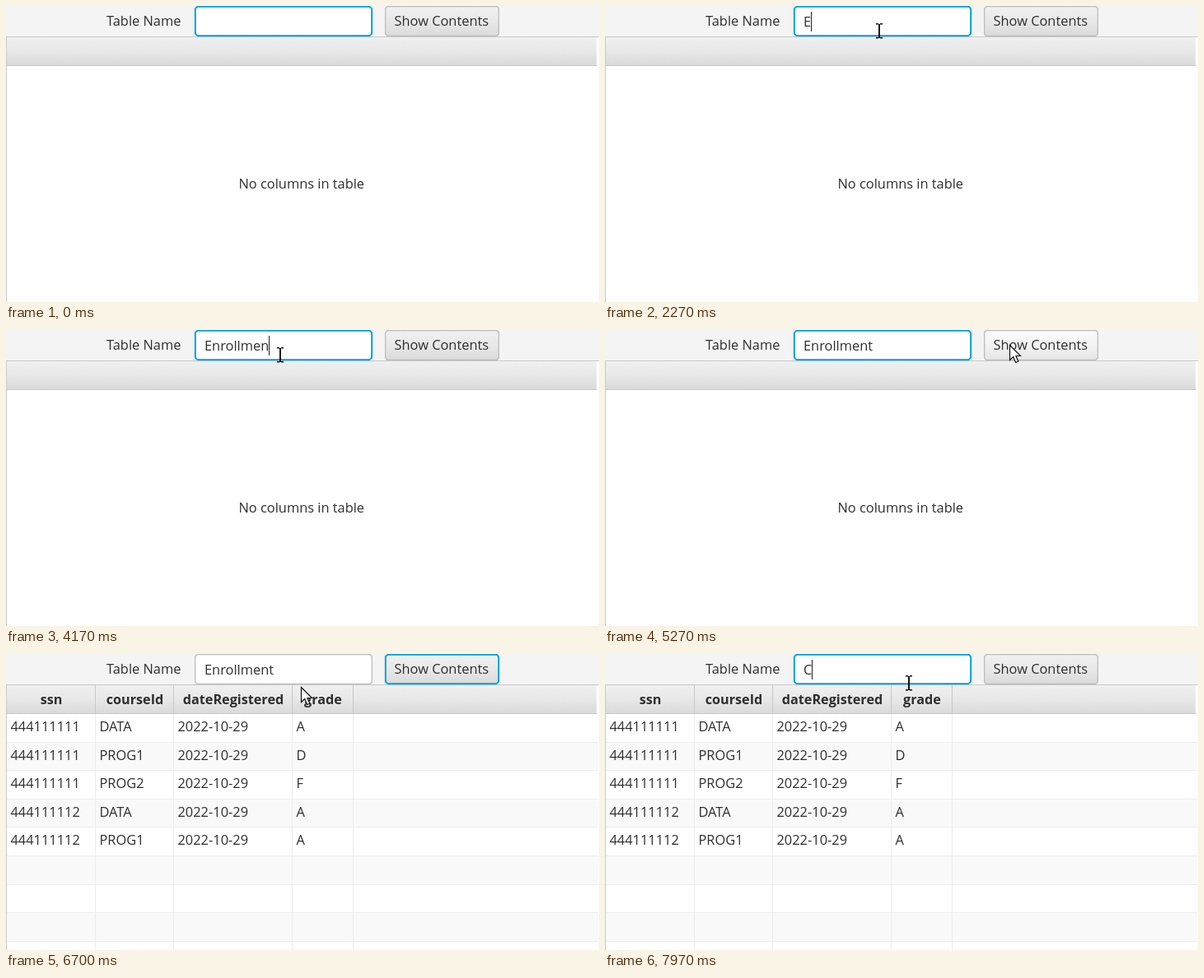
These frames come from a looping animation (720 px wide and 360 px high, 8 s). An HTML page with a canvas:

```html
<!DOCTYPE html>
<html lang="en">
<head>
<meta charset="utf-8">
<title>Show table contents</title>
<style>
  html, body { margin: 0; width: 100%; height: 100%; overflow: hidden; background: #f4f4f4; }
  canvas { display: block; width: 720px; height: 360px; }
</style>
</head>
<body>
<canvas id="stage" width="720" height="360"></canvas>
<script>
const ctx = document.getElementById('stage').getContext('2d');
const LOOP = 8000;
const FONT = '16.4px "Open Sans", "Noto Sans", sans-serif';
const BOLD = 'bold 16.2px "Open Sans", "Noto Sans", sans-serif';
const INK = '#2e2e2e', FOCUS = '#039ed3', HALO = '#039ed322', BORDER = '#bdbdbd', GRID = '#ededed';
const HEADER_Y = 38, BODY_Y = 72, ROW_H = 34.6;
const FIELD = { x: 229, y: 0, w: 216, h: 37 };
const BUTTON = { x: 460, y: 0, w: 139, h: 37 };
const TEXT_X = 241;

const COLUMNS = [
  { name: 'ssn', x: 0, end: 108 },
  { name: 'courseId', x: 108, end: 203 },
  { name: 'dateRegistered', x: 203, end: 347 },
  { name: 'grade', x: 347, end: 421 }
];
const DATE = '2022-10-29';
const ROWS = [
  ['444111111', 'DATA', DATE, 'A'],
  ['444111111', 'PROG1', DATE, 'D'],
  ['444111111', 'PROG2', DATE, 'F'],
  ['444111112', 'DATA', DATE, 'A'],
  ['444111112', 'PROG1', DATE, 'A']
];

const PRESS_BUTTON = 5650, TABLE_LOADED = 5850, PRESS_FIELD = 7050;

// Field contents over time: [time, text]
const WORD = 'Enrollment';
const EDITS = [[400, '']];
for (let i = 1; i <= WORD.length; i++) EDITS.push([1965 + 235 * i, WORD.slice(0, i)]);
EDITS.push([PRESS_FIELD, WORD]);
for (let i = 1; i <= WORD.length; i++) EDITS.push([7250 + 45 * i, WORD.slice(0, -i)]);
EDITS.push([7850, 'C']);

// Pointer stops: [time, x, y]
const PATH = [
  [0, 644, 372], [276, 644, 372], [1050, 333, 30], [4600, 333, 30],
  [5400, 503, 17], [6200, 503, 17], [6700, 358, 40], [6950, 369, 35], [LOOP, 369, 35]
];

function pointerAt(t) {
  const i = PATH.findIndex(stop => stop[0] > t);
  const [t0, x0, y0] = PATH[i - 1], [t1, x1, y1] = PATH[i];
  const u = (t - t0) / (t1 - t0), k = u * u * (3 - 2 * u);
  return { x: x0 + (x1 - x0) * k, y: y0 + (y1 - y0) * k };
}

function contains(box, { x, y }) {
  return x >= box.x && x < box.x + box.w && y >= box.y && y < box.y + box.h;
}

function rect(x, y, w, h, color) {
  ctx.fillStyle = color;
  ctx.fillRect(x, y, w, h);
}

function text(str, x, baseline, font = FONT, align = 'left') {
  ctx.font = font;
  ctx.textAlign = align;
  ctx.fillStyle = INK;
  ctx.fillText(str, x, baseline);
}

function gradient(y0, y1, ...colors) {
  const g = ctx.createLinearGradient(0, y0, 0, y1);
  colors.forEach((c, i) => g.addColorStop(i / (colors.length - 1), c));
  return g;
}

function outline(box, inset, width, color) {
  ctx.beginPath();
  ctx.roundRect(box.x + inset, box.y + inset, box.w - 2 * inset, box.h - 2 * inset, 4);
  ctx.lineWidth = width;
  ctx.strokeStyle = color;
  ctx.stroke();
}

function control(box, fill, focused) {
  const line = focused ? 1.8 : 1.3;
  if (focused) outline(box, -0.7, 1.4, HALO);
  outline(box, line / 2, line, focused ? FOCUS : BORDER);
  ctx.fillStyle = fill;
  ctx.fill();
  ctx.stroke();
}

function drawForm(t, pointer) {
  const buttonFocused = t >= PRESS_BUTTON && t < PRESS_FIELD;
  const [editTime, value] = EDITS.filter(e => e[0] <= t).pop() || [0, ''];
  text('Table Name', 122, 24);
  control(FIELD, '#fff', !buttonFocused);
  text(value, TEXT_X, 25);
  const caretOn = t >= EDITS[0][0] && (t - editTime) % 1000 < 500;
  if (caretOn && !buttonFocused) {
    rect(Math.round(TEXT_X - 0.5 + ctx.measureText(value).width), 7, 1, 24, '#222');
  }
  const shades = contains(BUTTON, pointer) ? ['#fbfbfb', '#f3f3f3', '#e5e5e5'] : ['#f1f1f1', '#e8e8e8', '#dadada'];
  control(BUTTON, gradient(0, 37, ...shades), buttonFocused);
  text('Show Contents', 471.5, 24);
}

function drawTable(loaded) {
  rect(0, HEADER_Y, 720, 322, '#fff');
  rect(1, HEADER_Y, 716, BODY_Y - HEADER_Y, gradient(HEADER_Y, BODY_Y, '#f0f0f0', '#e8e8e8', '#dadada'));
  rect(0, HEADER_Y - 1, 720, 1, '#c8c8c8');
  rect(0, BODY_Y, 718, 1, '#c8c8c8');
  if (loaded) drawRows();
  else text('No columns in table', 282.5, 222);
  rect(0, HEADER_Y, 1, 322, '#c8c8c8');
}

function drawRows() {
  for (let i = 0; i < 9; i++) {
    const y = Math.round(BODY_Y + i * ROW_H);
    if (i % 2) rect(1, y, 718, ROW_H, '#f9f9f9');
    if (i) rect(1, y, 718, 1, GRID);
  }
  COLUMNS.forEach(({ name, x, end }, c) => {
    rect(end, HEADER_Y, 1, BODY_Y - HEADER_Y, '#c8c8c8');
    rect(end, BODY_Y + 1, 1, 288, GRID);
    text(name, (x + end) / 2 + 1, 61, BOLD, 'center');
    ROWS.forEach((row, r) => text(row[c], x + 5.5, Math.round(94 + r * ROW_H)));
  });
}

function drawPointer(pointer) {
  ctx.save();
  ctx.translate(Math.round(pointer.x), Math.round(pointer.y));
  if (contains(FIELD, pointer)) {
    rect(-1, -8, 2, 17, '#111');
    for (const serifY of [-9, 8]) {
      rect(-4, serifY, 3, 1.5, '#111');
      rect(1, serifY, 3, 1.5, '#111');
    }
  } else {
    const arrow = new Path2D('M.5 .5V18.5L4.7 14.6L7.6 21.5L10.8 20.2L7.9 13.5H13.5Z');
    ctx.fillStyle = '#fff';
    ctx.fill(arrow);
    ctx.lineWidth = 1.2;
    ctx.strokeStyle = '#111';
    ctx.stroke(arrow);
  }
  ctx.restore();
}

function draw() {
  const t = performance.now() % LOOP;
  const pointer = pointerAt(t);
  rect(0, 0, 720, 360, '#f4f4f4');
  drawTable(t >= TABLE_LOADED);
  drawForm(t, pointer);
  drawPointer(pointer);
  requestAnimationFrame(draw);
}

draw();
</script>
</body>
</html>
```
